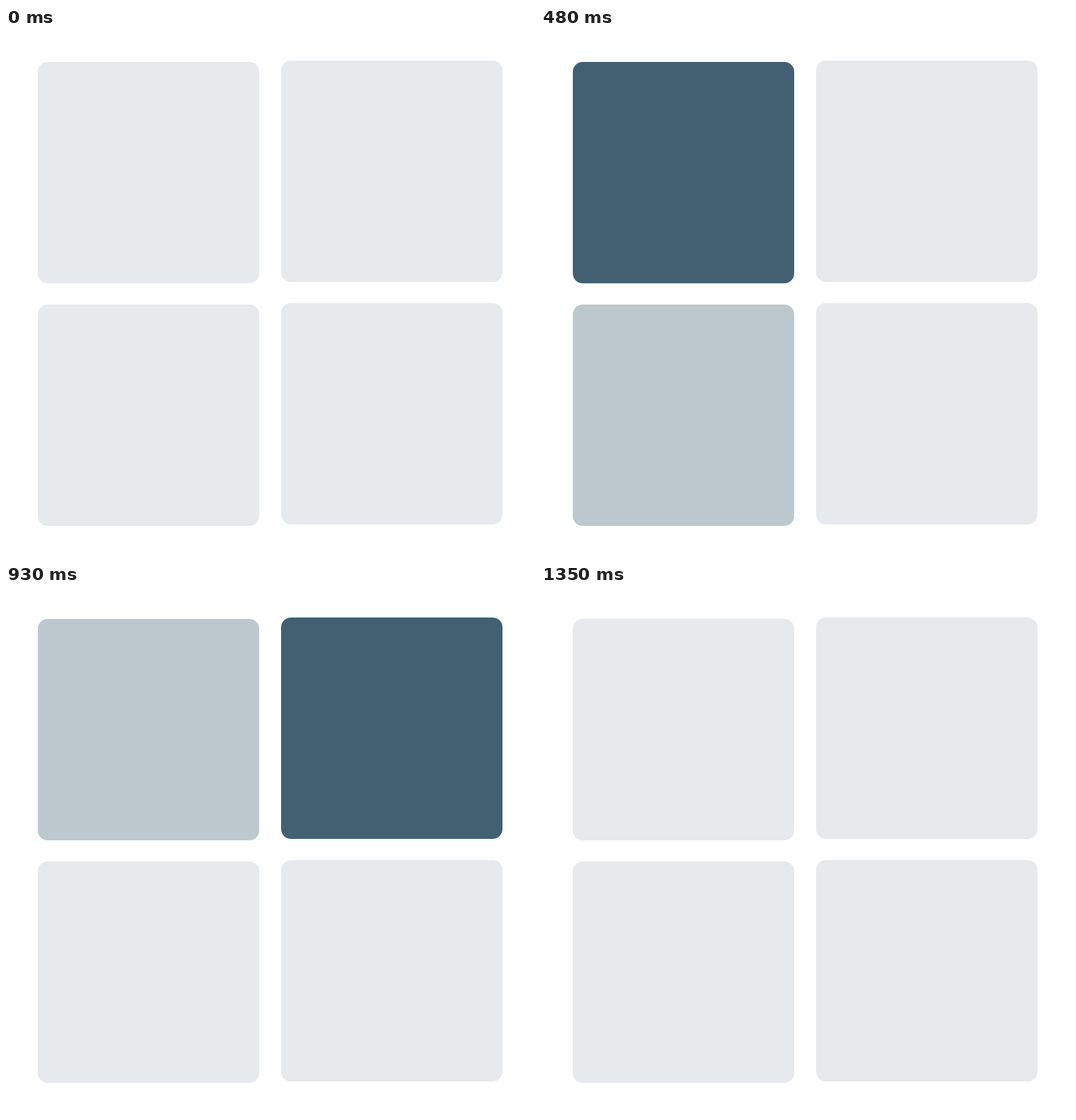
An HTML page with a canvas that plays this animation: 748x748 px, repeating every 1380 ms.

```html
<!DOCTYPE html>
<html lang="en">
<head>
<meta charset="utf-8">
<title>Four tile loader</title>
<style>
  html, body { margin: 0; width: 100%; height: 100%; overflow: hidden; background: #fff; }
  canvas { display: block; }
</style>
</head>
<body>
<canvas id="stage" width="748" height="748"></canvas>
<script>
  const ctx = document.getElementById("stage").getContext("2d");
  const LOOP = 1380, TICK = 30, STEP = 150, ROUND = 600, ROUNDS = 2;
  const SIZE = 313, RADIUS = 14;
  const LIGHT = [230, 234, 237], DARK = [25, 62, 83];

  // Listed in the order in which they light up.
  const tiles = [
    { x: 389, y: 389 },
    { x: 389, y: 46 },
    { x: 45, y: 48 },
    { x: 45, y: 391 }
  ];

  // Linear rise and fall around each peak.
  function intensity(index, time) {
    let level = 0;
    for (let round = 0; round < ROUNDS; round++) {
      const peak = STEP * (index + 1) + ROUND * round;
      level = Math.max(level, 1 - Math.abs(time - peak) / STEP);
    }
    return level;
  }

  function mix(level) {
    return `rgb(${LIGHT.map((c, i) => Math.round(c + (DARK[i] - c) * level)).join(",")})`;
  }

  function draw(now) {
    const time = Math.floor((now % LOOP) / TICK) * TICK;
    ctx.fillStyle = "#fff";
    ctx.fillRect(0, 0, 748, 748);
    tiles.forEach(({ x, y }, index) => {
      ctx.fillStyle = mix(intensity(index, time));
      ctx.beginPath();
      ctx.roundRect(x, y, SIZE, SIZE, RADIUS);
      ctx.fill();
    });
  }

  function loop() {
    draw(performance.now());
    requestAnimationFrame(loop);
  }
  loop();
</script>
</body>
</html>
```
